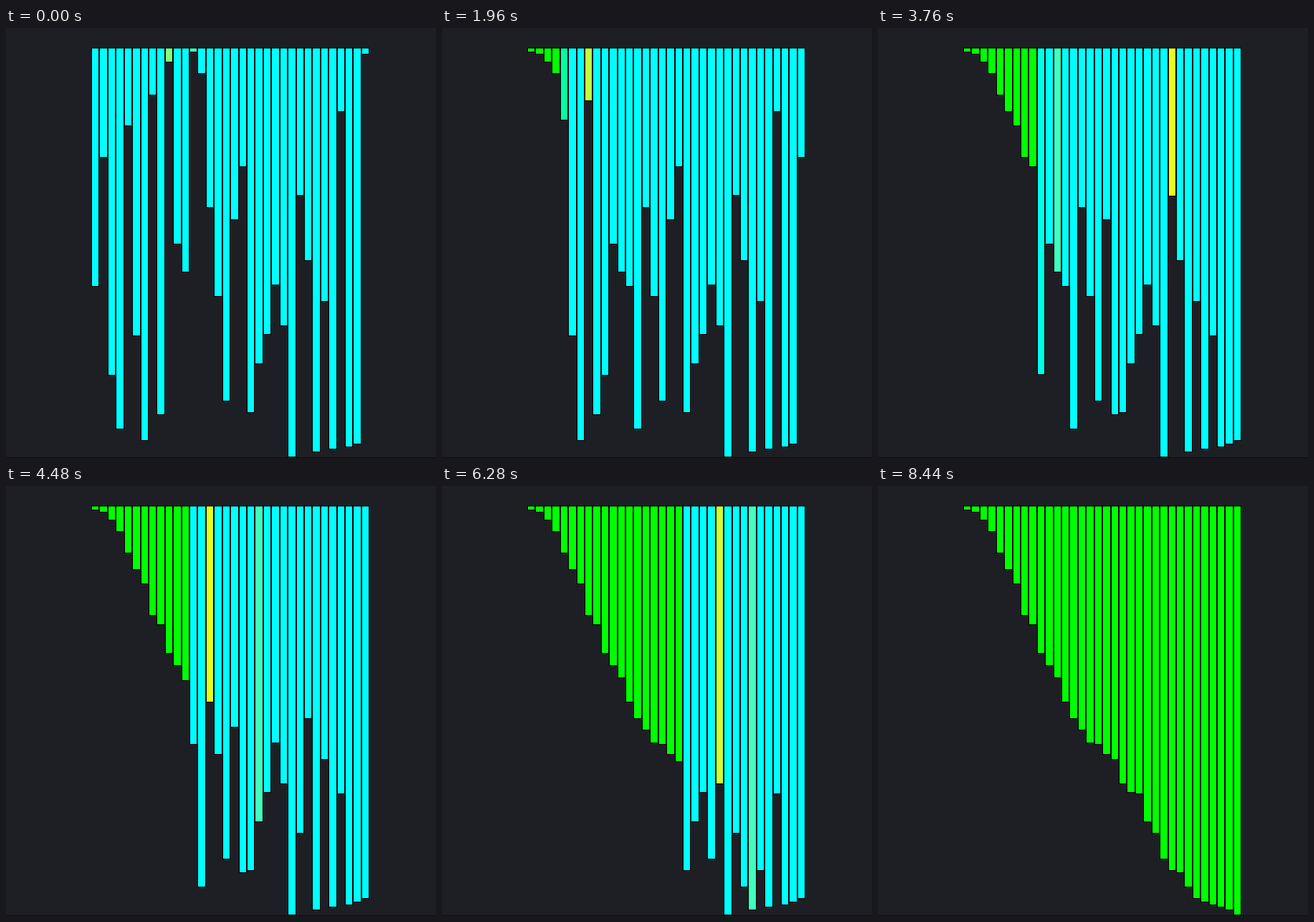
An HTML page with a canvas for the animation above (8480 ms loop, 600 px wide and 600 px high).

```html
<!DOCTYPE html>
<html lang="en">
<head>
<meta charset="utf-8">
<title>Selection sort</title>
<style>
html, body { margin: 0; width: 100%; height: 100%; overflow: hidden; background: #1e1f24; }
canvas { display: block; }
</style>
</head>
<body>
<canvas id="stage" width="600" height="600"></canvas>
<script>
const ctx = document.getElementById("stage").getContext("2d");
const LOOP = 8480, STEP = 40;
const TOP = 27.5, LEFT = 119, PITCH = 11.42;
const FADE = 10;          // transition length in ticks
const HEIGHT_LAG = 0.9;   // heights follow the colours by this many ticks
const CYAN = [0, 255, 255], YELLOW = [255, 255, 0], GREEN = [0, 255, 0];
const MINT = [64, 255, 191];

// y of each bar's lower edge before sorting
const bottoms = [
  360, 180, 484, 559, 136, 429, 575, 93, 539, 47, 301, 340, 33, 63, 250, 374, 520,
  267, 193, 536, 468, 427, 358, 415, 598, 233, 324, 591, 381, 587, 116, 584, 580, 36
];
const n = bottoms.length;

// time in ms against sorting ticks
const pace = [[0, 12.2], [1960, 162.35], [3760, 296], [5200, 404.1],
              [6280, 483.99], [6960, 534.8], [8480, 648]];

function tickAt(ms) {
  let k = 1;
  while (k < pace.length - 1 && ms > pace[k][0]) k++;
  const [t0, u0] = pace[k - 1], [t1, u1] = pace[k];
  return u0 + (u1 - u0) * (ms - t0) / (t1 - t0);
}

const bezier = (a, b, s) => 3 * a * s * (1 - s) ** 2 + 3 * b * s * s * (1 - s) + s ** 3;

// the CSS "ease" curve
function ease(x) {
  if (x <= 0) return 0;
  if (x >= 1) return 1;
  let lo = 0, hi = 1;
  for (let k = 0; k < 24; k++) {
    const mid = (lo + hi) / 2;
    if (bezier(0.25, 0.25, mid) < x) lo = mid; else hi = mid;
  }
  return bezier(0.1, 1, lo);
}

// A value with eased changes; going back midway takes less time.
class Track {
  constructor(value) {
    this.parts = [{ u: -99, from: value, to: value, len: 1 }];
  }
  at(u) {
    let p = this.parts[0];
    for (const q of this.parts) if (q.u <= u) p = q;
    const e = ease((u - p.u) / p.len);
    return p.from.map((v, k) => v + (p.to[k] - v) * e);
  }
  go(u, to) {
    const last = this.parts[this.parts.length - 1];
    const e = ease((u - last.u) / last.len);
    const back = e < 1 && String(last.from) === String(to);
    this.parts.push({ u, from: this.at(u), to, len: back ? Math.max(FADE * e, 0.01) : FADE });
  }
}

const colors = bottoms.map(() => new Track(CYAN));
const heights = bottoms.map(b => new Track([b]));
const passes = [];

function planSort() {
  const a = bottoms.slice();
  let start = 0;
  for (let i = 0; i < n; i++) {
    passes.push({ i, start });
    let min = i;
    for (let j = i + 1; j < n; j++) {
      if (a[j] >= a[min]) continue;
      const u = start + j - i;
      if (min !== i) colors[min].go(u, CYAN);
      min = j;
      colors[j].go(u, YELLOW);
    }
    start += n - i;
    if (min !== i) {
      colors[min].go(start, CYAN);
      [a[i], a[min]] = [a[min], a[i]];
      heights[i].go(start + HEIGHT_LAG, [a[i]]);
      heights[min].go(start + HEIGHT_LAG, [a[min]]);
    }
    colors[i].go(start, GREEN);
  }
}

// index of the bar being compared, or -1
function scanAt(u) {
  for (const { i, start } of passes) {
    const k = Math.floor(u - start);
    if (k >= 1 && k < n - i) return i + k;
    if (k < n - i) return -1;
  }
  return -1;
}

function draw(ms) {
  const u = tickAt(ms), scan = scanAt(u);
  ctx.fillStyle = "#1e1f24";
  ctx.fillRect(0, 0, 600, 600);
  ctx.fillStyle = "#0b0b0d";
  ctx.fillRect(0, 599, 600, 1);
  for (let k = 0; k < n; k++) {
    const x = Math.round(LEFT + PITCH * k);
    const w = Math.round(LEFT + PITCH * (k + 1)) - x;
    const y = Math.round(heights[k].at(u)[0]);
    let c = colors[k].at(u);
    if (k === scan && c[0] < MINT[0]) c = MINT;
    ctx.fillStyle = "#000";
    ctx.fillRect(x, TOP, w, y + 1 - TOP);
    ctx.fillStyle = `rgb(${c.map(Math.round).join(",")})`;
    ctx.fillRect(x + 1, TOP + 1, w - 2, y - TOP - 1);
  }
}

planSort();
const begin = performance.now();
function frame() {
  const t = (performance.now() - begin) % LOOP;
  draw(Math.floor(t / STEP) * STEP);
  requestAnimationFrame(frame);
}
frame();
</script>
</body>
</html>
```
